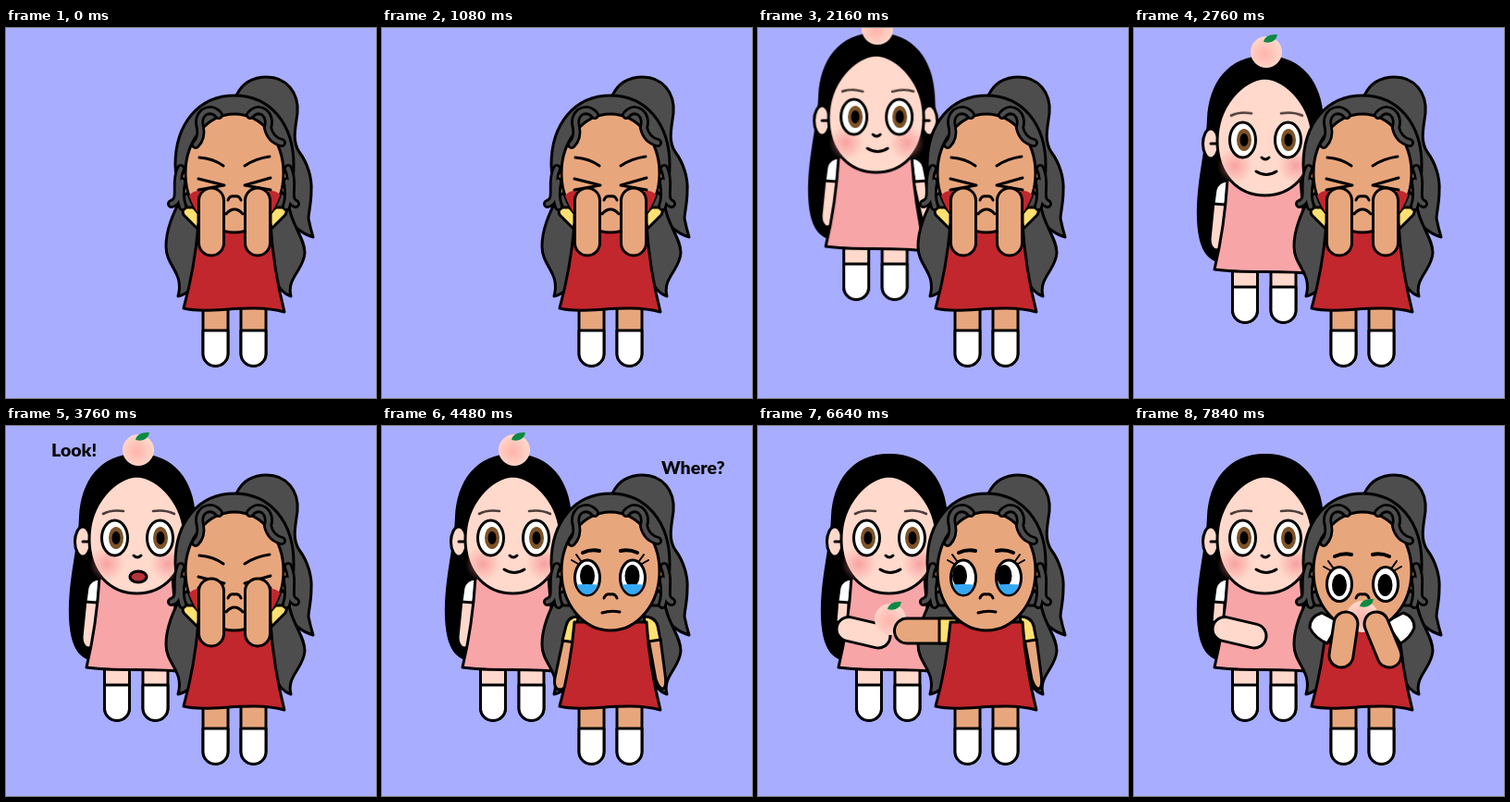
These frames come from a looping animation (400x400 px, 8000 ms). An HTML page:

```html
<!DOCTYPE html>
<html lang="en">
<head>
<meta charset="utf-8">
<title>Sharing a peach</title>
<style>
  html, body { margin: 0; width: 100%; height: 100%; overflow: hidden; background: #a8adff; }
  svg { display: block; width: 100vw; height: 100vh; }
  text { font: 900 19.5px Lato, Inter, sans-serif; fill: #0a0a0a; }

  .ink { stroke: #000; stroke-width: 3; stroke-linejoin: round; stroke-linecap: round; }
  .line { fill: none; }
  .lash { stroke-width: 2; }
  .brow { stroke-width: 4; }
  .white { fill: #fff; }
  .pale { fill: #ffd9cb; }
  .tan { fill: #e8a67d; }
  .grey { fill: #4d4d4d; }
  .yellow { fill: #ffe070; }
  .outer { fill: none; stroke: #000; stroke-width: 29; stroke-linecap: round; }
  .inner { fill: none; stroke: #e8a67d; stroke-width: 23; stroke-linecap: round; }
  .inner.light { stroke: #ffd9cb; }
  .lockOut { fill: none; stroke: #000; stroke-width: 10; stroke-linecap: round; }
  .lockIn { fill: none; stroke: #4d4d4d; stroke-width: 4.4; stroke-linecap: round; }

  /* Hard switches */
  .cry, .look, .smile, .where, .sad, .eat, .hangL, .hangR, .hold, .reach, .rest, .bent,
  .headPeach, .handPeach, .enter, .fists, .dress, .nod {
    animation: 8s step-end infinite;
  }
  .cry { animation-name: cry; }
  .look { animation-name: look; }
  .smile { animation-name: smile; }
  .where { animation-name: where; }
  .sad { animation-name: sad; }
  .eat { animation-name: eat; }
  .hangL { animation-name: hangL; }
  .hangR { animation-name: hangR; }
  .hold { animation-name: hold; }
  .reach { animation-name: reach; }
  .rest { animation-name: rest; }
  .bent { animation-name: bent; }
  .headPeach { animation-name: headPeach; }
  .handPeach { animation-name: handPeach; }
  .enter { animation-name: enter; }
  .fists { animation-name: fists; }
  .dress { animation-name: dress; transform-origin: 247px 215px; }
  .nod { animation-name: nod; }

  @keyframes cry { 0% { opacity: 1 } 55% { opacity: 0 } }
  @keyframes look { 0% { opacity: 0 } 47% { opacity: 1 } 55% { opacity: 0 } }
  @keyframes smile { 0% { opacity: 1 } 47% { opacity: 0 } 55% { opacity: 1 } }
  @keyframes where { 0% { opacity: 0 } 56% { opacity: 1 } 64.5% { opacity: 0 } }
  @keyframes sad { 0% { opacity: 0 } 55% { opacity: 1 } 89.5% { opacity: 0 } }
  @keyframes eat { 0% { opacity: 0 } 89.5% { opacity: 1 } }
  @keyframes hangL { 0% { opacity: 0 } 55% { opacity: 1 } 82% { opacity: 0 } }
  @keyframes hangR { 0% { opacity: 0 } 55% { opacity: 1 } 85.5% { opacity: 0 } }
  @keyframes hold { 0% { opacity: 0 } 85.5% { opacity: 1 } }
  @keyframes reach { 0% { opacity: 0 } 82% { opacity: 1 } 85.5% { opacity: 0 } }
  @keyframes rest { 0% { opacity: 1 } 71.5% { opacity: 0 } }
  @keyframes bent { 0% { opacity: 0 } 71.5% { opacity: 1 } }
  @keyframes headPeach { 0% { opacity: 1 } 83.5% { opacity: 0 } }
  @keyframes handPeach { 0% { opacity: 0 } 83.5% { opacity: 1 } }
  @keyframes enter { 0% { opacity: 0 } 22.5% { opacity: 1 } }
  @keyframes fists {
    0%, 5.5%, 9.5%, 13.5%, 17.5%, 21.5%, 25.5%, 29.5%, 33.5%, 37.5% { transform: none }
    3.5%, 7.5%, 11.5%, 15.5%, 19.5%, 23.5%, 27.5%, 31.5%, 35.5%, 39.5% { transform: translateY(-8px) }
  }
  @keyframes dress {
    0%, 5.5%, 9.5%, 13.5%, 17.5%, 21.5%, 25.5%, 29.5%, 33.5%, 37.5% { transform: none }
    3.5%, 7.5%, 11.5%, 15.5%, 19.5%, 23.5%, 27.5%, 31.5%, 35.5% { transform: scale(1.05, 1.01) }
  }
  @keyframes nod {
    0%, 94%, 98% { transform: none }
    92%, 96% { transform: translateY(-3px) }
  }

  /* Smooth moves */
  .walk, .browL, .browR, .gaze, .swing, .drop, .stretch, .carry { animation: 8s linear infinite; }
  .walk { animation-name: walk; }
  .browL { animation-name: browL; transform-origin: 116px 94px; }
  .browR { animation-name: browR; transform-origin: 171px 94px; }
  .gaze { animation-name: gaze; }
  .swing { animation-name: swing; transform-origin: 98px 219.5px; }
  .drop { animation-name: drop; }
  .stretch { animation-name: stretch; }
  .carry { animation-name: carry; }

  @keyframes walk { 0%, 23% { transform: translate(-36px, -65px) } 29.5%, 100% { transform: none } }
  @keyframes browL { 0%, 32.5% { transform: rotate(8deg) } 35%, 100% { transform: none } }
  @keyframes browR { 0%, 32.5% { transform: rotate(-8deg) } 35%, 100% { transform: none } }
  @keyframes gaze { 0%, 64.5% { transform: none } 66.5%, 100% { transform: translateX(-4px) } }
  @keyframes swing {
    0%, 71.5% { transform: rotate(75deg) }
    75% { transform: rotate(-70deg) }
    81.5%, 100% { transform: none }
  }
  @keyframes drop {
    0%, 75% { transform: none; animation-timing-function: ease-in-out }
    81.5%, 100% { transform: translateY(183px) }
  }
  @keyframes stretch {
    0%, 82% { transform: translateX(48px) }
    83%, 83.5% { transform: none }
    85.5%, 100% { transform: translateX(48px) }
  }
  @keyframes carry {
    0%, 83.5% { transform: translate(143px, 209px) }
    85.5%, 100% { transform: translate(247px, 206px) }
  }
</style>
</head>
<body>
<svg viewBox="0 0 400 400">
  <defs>
    <radialGradient id="blush">
      <stop offset="0" stop-color="#f58a8e" stop-opacity=".7"/>
      <stop offset="1" stop-color="#f58a8e" stop-opacity="0"/>
    </radialGradient>
    <radialGradient id="fuzz" cx=".45" cy=".55" r=".55">
      <stop offset="0" stop-color="#ffb3ab"/>
      <stop offset="1" stop-color="#ffd9cb"/>
    </radialGradient>
    <g id="peach">
      <circle r="17" fill="url(#fuzz)"/>
      <path d="M-3-11Q-1-20 12-19Q10-8-3-11Z" fill="#0b8a43"/>
    </g>
    <path id="leg" d="M0 0V50A13.500 13.500 0 0 0 27 50V0Z"/>
    <path id="sock" d="M0 25V50A13.500 13.500 0 0 0 27 50V25Z"/>
    <path id="nose" d="M240 186Q242 181 247 182Q252 181 254 186"/>
    <path id="brows" d="M217 137Q226 133 235 135M258 135Q267 133 276 137"/>
    <g id="locks">
      <path d="M230 94Q223 86 214 91Q207 97 210 108Q212 119 205 126"/>
      <path d="M264 94Q271 86 279 91Q286 97 283 108Q286 121 298 124"/>
      <path d="M189 152C181 168 192 186 179 190"/>
      <path d="M190 166Q187 182 191 193"/>
      <path d="M305 152C313 168 302 186 313 190"/>
      <path d="M304 166Q307 182 303 193"/>
    </g>
    <clipPath id="face2"><ellipse cx="247" cy="157" rx="53" ry="64"/></clipPath>
    <clipPath id="wetEyes">
      <ellipse cx="222" cy="164" rx="12.500" ry="18"/>
      <ellipse cx="271" cy="164" rx="12.500" ry="18"/>
    </clipPath>
  </defs>

  <rect width="400" height="400" fill="#a8adff"/>

  <!-- Girl in pink -->
  <g class="enter"><g class="walk">
    <path d="M142 30C101 30 81 60 79 98C78 130 67 165 68 206C69 232 75 246 87 252L194 252C207 246 213 225 212 200C212 165 206 130 205 98C203 60 183 30 142 30Z"/>
    <g class="ink pale">
      <use href="#leg" x="106.500" y="255"/>
      <use href="#leg" x="148" y="255"/>
    </g>
    <g class="ink white">
      <use href="#sock" x="106.500" y="255"/>
      <use href="#sock" x="148" y="255"/>
    </g>
    <g class="ink">
      <g class="pale">
        <path class="rest" d="M86 188L82 228Q82 239 89 240Q95 240 97 225L100 188Z"/>
        <path class="bent" d="M86 188L84 212H98V188Z"/>
        <path d="M181 188L190 228Q193 239 198 237Q202 234 200 224L195 188Z"/>
      </g>
      <path class="white" d="M102 165Q91 165 88 175L86 190L99 191Z"/>
      <path class="white" d="M179 165Q190 165 193 175L196 190L183 191Z"/>
      <path d="M101 164Q98 215 87 261C120 266 160 261 195 266Q183 215 180 164Z" fill="#f8a5a8"/>
      <g class="pale">
        <ellipse cx="83" cy="125" rx="8.500" ry="16"/>
        <ellipse cx="199" cy="125" rx="8.500" ry="16"/>
        <path d="M141.500 54C118 55 90 84 90 122C90 158 112 181 141.500 181C171 181 193 158 193 122C193 84 165 55 141.500 54Z"/>
      </g>
      <path class="line" d="M83 125H89M193 125H199"/>
    </g>
    <circle cx="109" cy="149" r="19" fill="url(#blush)"/>
    <circle cx="175" cy="149" r="19" fill="url(#blush)"/>
    <g fill="none" stroke="#4d3d3a" stroke-width="2.600" stroke-linecap="round">
      <path class="browL" d="M105 95Q114 90 127 92"/>
      <path class="browR" d="M159 92Q172 90 182 95"/>
    </g>
    <g class="ink white">
      <ellipse cx="117.500" cy="121" rx="14" ry="19"/>
      <ellipse cx="166.500" cy="121" rx="14" ry="19"/>
    </g>
    <g fill="#7d5227">
      <ellipse cx="119" cy="121" rx="8" ry="12"/>
      <ellipse cx="167" cy="121" rx="8" ry="12"/>
    </g>
    <ellipse cx="119" cy="121" rx="4.500" ry="7"/>
    <ellipse cx="167" cy="121" rx="4.500" ry="7"/>
    <path class="ink line" d="M138 140Q142 144 146 140"/>
    <path class="ink line smile" d="M132 155Q143 162 154 155"/>
    <ellipse class="ink look" cx="143" cy="163" rx="9" ry="6" fill="#b5333a"/>
    <g class="bent"><g class="swing">
      <path class="outer" d="M98 219.500L130 227"/>
      <path class="inner light" d="M98 219.500L130 227"/>
    </g></g>
    <g class="headPeach"><g class="drop"><use href="#peach" x="143" y="26"/></g></g>
  </g></g>
  <text class="look" x="49" y="33">Look!</text>

  <!-- Girl in red -->
  <g class="ink">
    <g class="grey">
      <path d="M249 73C256 58 268 53 282 53C303 53 317 70 315 92C313 108 309 122 317 134C326 146 331 162 330 176C330 190 327 200 327 206Q329 216 332 226Q312 220 302 200L262 110Z"/>
      <path d="M192 180C180 200 173 220 173 236C173 258 193 264 186 290Q200 287 206 270L290 270Q296 286 308 290C303 270 322 262 323 243C323 226 308 215 303 180Z"/>
    </g>
    <g class="tan">
      <use href="#leg" x="213" y="302"/>
      <use href="#leg" x="254" y="302"/>
    </g>
    <g class="white">
      <use href="#sock" x="213" y="302"/>
      <use href="#sock" x="254" y="302"/>
    </g>

    <g class="cry yellow">
      <path d="M195 186Q189 194 192 202L208 218V200Z"/>
      <path d="M299 186Q306 194 302 202L286 218V200Z"/>
    </g>
    <g class="hangL">
      <path class="tan" d="M196 230L187 272Q185 284 192 285Q199 285 202 272L209 230Z"/>
      <path class="yellow" d="M212 206Q201 206 199 216L195 232L209 234Z"/>
    </g>
    <g class="hangR">
      <path class="tan" d="M288 230L296 274Q300 285 304 284Q308 282 306 268L301 230Z"/>
      <path class="yellow" d="M283 206Q295 206 298 216L301 231L288 233Z"/>
    </g>
    <g class="reach"><g class="stretch">
      <path class="tan" d="M215 208H161A13.500 13.500 0 0 0 161 235H215Z"/>
      <path class="yellow" d="M196 208H215V235H196Z"/>
    </g></g>

    <path class="dress" d="M208 212Q204 260 192 303C222 310 262 297 301 307Q289 260 286 212Z" fill="#c1272d"/>

    <g class="hold white">
      <path d="M203 202Q190 206 190 218Q195 229 209 235L222 212Z"/>
      <path d="M291 202Q303 206 303 218Q299 229 288 235L272 212Z"/>
    </g>
    <path class="grey" d="M247 73C208 73 183 104 183 148Q184 178 196 194L299 194Q311 178 311 148C311 104 286 73 247 73Z"/>
  </g>

  <g class="nod">
    <g class="ink tan">
      <ellipse cx="193" cy="168" rx="6" ry="12"/>
      <ellipse cx="302" cy="168" rx="6" ry="12"/>
      <ellipse cx="247" cy="157" rx="53" ry="64"/>
    </g>

    <g class="cry">
      <g fill="#c1272d" clip-path="url(#face2)">
        <circle cx="208" cy="188" r="12"/>
        <circle cx="287" cy="188" r="12"/>
      </g>
      <g class="ink line">
        <path d="M209 140Q224 141 235 149M258 149Q270 141 285 139"/>
        <path d="M208 163L236 170L208 175M286 162L258 170L286 175"/>
        <use href="#nose"/>
        <path d="M238 201Q247 191 256 201"/>
      </g>
    </g>

    <g class="sad">
      <g class="ink line">
        <use href="#brows" class="brow"/>
        <path class="lash" d="M212 149L205 145M215 146L210 139M281 149L288 145M278 146L283 139"/>
      </g>
      <g class="ink white">
        <ellipse cx="222" cy="164" rx="13.500" ry="19"/>
        <ellipse cx="271" cy="164" rx="13.500" ry="19"/>
      </g>
      <g clip-path="url(#wetEyes)">
        <g class="gaze">
          <ellipse cx="222" cy="162" rx="8" ry="12"/>
          <ellipse cx="270.500" cy="162" rx="8" ry="12"/>
        </g>
        <path d="M205 172Q221 170 237 172V185H205ZM255 172Q271 170 287 172V185H255Z" fill="#35a8f4"/>
      </g>
      <g class="ink line">
        <use href="#nose"/>
        <path d="M238 202Q247 199 257 201"/>
      </g>
    </g>

    <g class="eat">
      <g class="ink line">
        <use href="#brows" class="brow" y="4"/>
        <path class="lash" d="M212 156L205 152M215 153L210 146M282 156L289 152M279 153L284 146"/>
      </g>
      <g class="ink white">
        <ellipse cx="222" cy="171" rx="13.500" ry="18.500"/>
        <ellipse cx="272" cy="171" rx="13.500" ry="18.500"/>
      </g>
      <ellipse cx="222" cy="172" rx="8" ry="12"/>
      <ellipse cx="271.500" cy="172" rx="8" ry="12"/>
      <use href="#nose" class="ink line"/>
    </g>

    <use href="#locks" class="lockOut"/>
    <use href="#locks" class="lockIn"/>

    <g class="handPeach"><g class="carry"><use href="#peach"/></g></g>
    <g class="hold">
      <path class="outer" d="M229 214L224 248M262 214L276 248"/>
      <path class="inner" d="M229 214L224 248M262 214L276 248"/>
    </g>
  </g>

  <g class="cry"><g class="fists ink tan">
    <rect x="208.500" y="173" width="27" height="73" rx="13.500"/>
    <rect x="258.500" y="173" width="27" height="73" rx="13.500"/>
  </g></g>
  <text class="where" x="302" y="51.500">Where?</text>
</svg>
</body>
</html>
```
